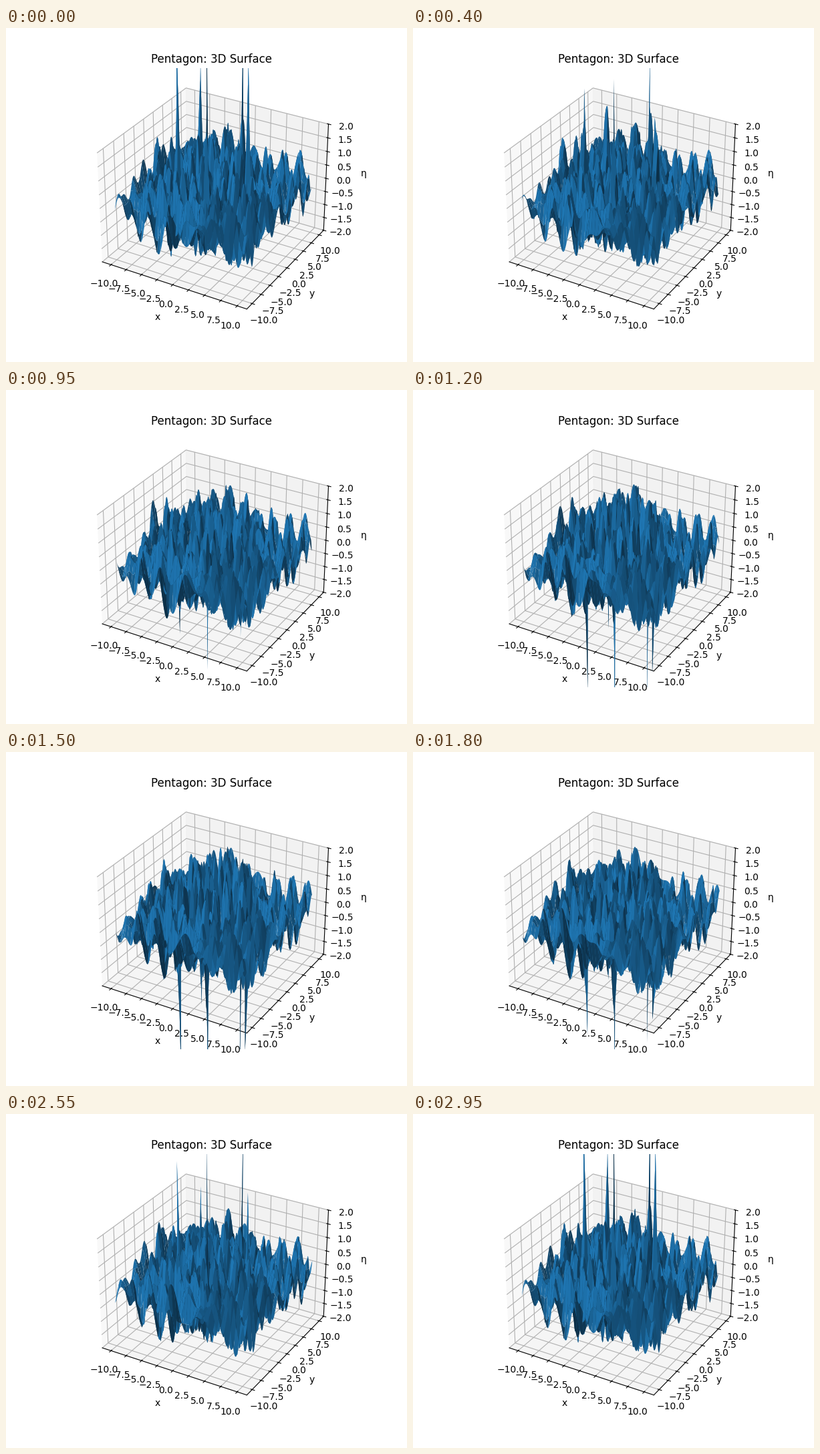
These frames come from a looping animation (600 px wide and 500 px high, 3000 ms). A matplotlib script:

```python
import numpy as np
import matplotlib.pyplot as plt
from matplotlib.animation import FuncAnimation

FRAMES, INTERVAL = 60, 50
WAVELENGTH = 2.0
RADIUS = 5.0
SIDES = 5

k = 2 * np.pi / WAVELENGTH
phases = np.linspace(0, 2 * np.pi, FRAMES)

axis = np.linspace(-10, 10, 200)
X, Y = np.meshgrid(axis, axis)

# Circular waves spread from the corners of a regular pentagon.
field = np.zeros_like(X, dtype=complex)
for angle in 2 * np.pi * np.arange(SIDES) / SIDES:
    r = np.hypot(X - RADIUS * np.cos(angle), Y - RADIUS * np.sin(angle))
    field += np.exp(1j * k * r) / np.sqrt(r)

fig = plt.figure(figsize=(6, 5), dpi=100)
ax = fig.add_subplot(projection="3d")
ax.set_title("Pentagon: 3D Surface")
ax.set_xlabel("x")
ax.set_ylabel("y")
ax.set_zlabel("η")
ax.set_zlim(-2, 2)

surface = None


def draw(i):
    global surface
    if surface is not None:
        surface.remove()
    eta = (field * np.exp(-1j * phases[i])).real
    surface = ax.plot_surface(X, Y, eta, rstride=5, cstride=5, color="C0")
    ax.set_zlim(-2, 2)
    return (surface,)


anim = FuncAnimation(fig, draw, frames=FRAMES, interval=INTERVAL,
                     init_func=lambda: draw(0), repeat=True, repeat_delay=0)
plt.show()
```
